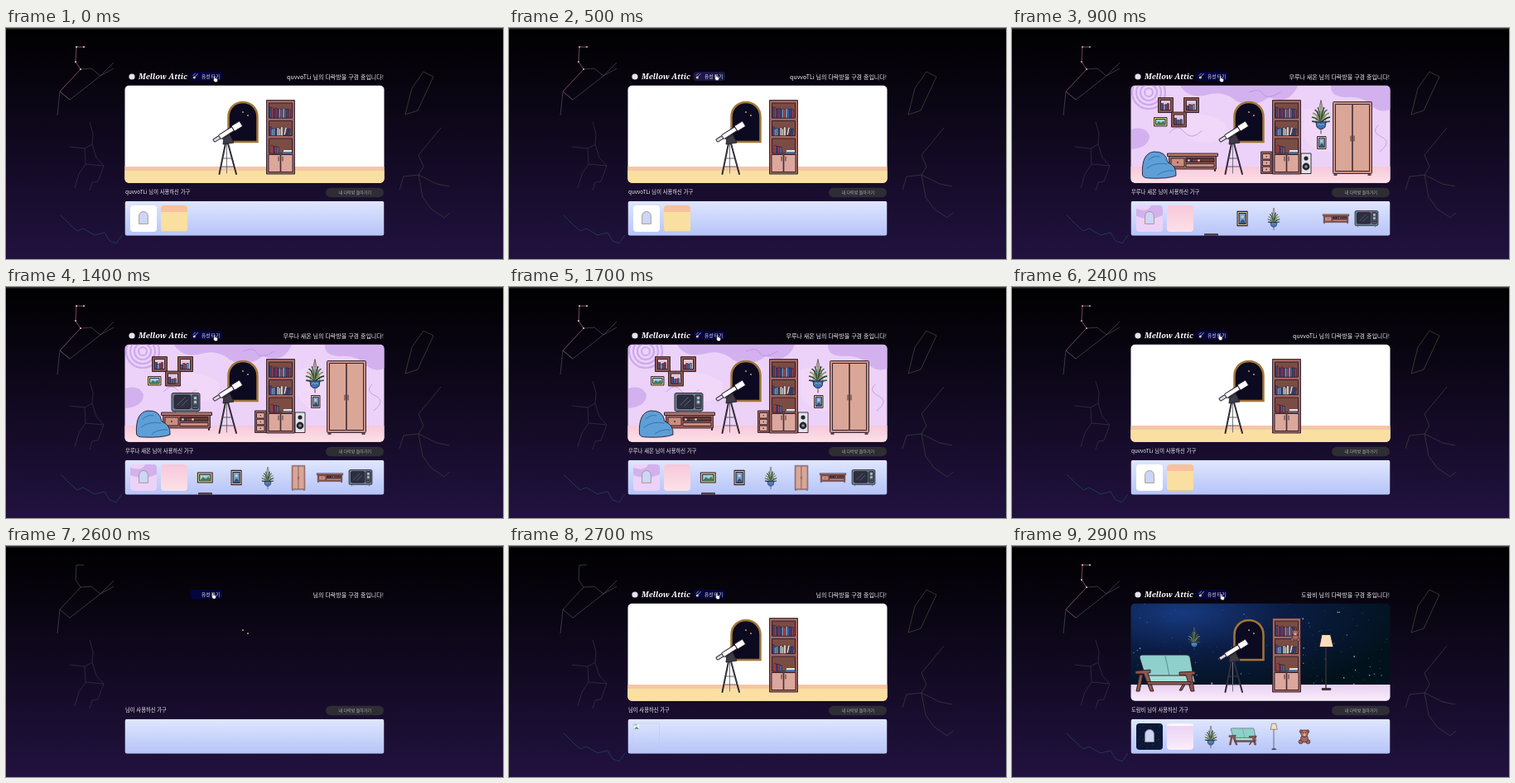
An HTML page that plays this animation: 600 px wide and 280 px high, repeating every 3 s.

```html
<!DOCTYPE html>
<html lang="ko">
<head>
<meta charset="utf-8">
<style>
html, body { margin: 0; width: 100%; height: 100%; overflow: hidden; background: #000; }
svg { display: block; width: 600px; height: 280px; }
text { font-family: "Noto Sans CJK KR", "Noto Sans CJK", "Noto Sans", sans-serif; font-weight: 500; fill: #f2f2f6; }
.logo { font: italic bold 9.2px "Noto Serif", serif; fill: #fff; }
.o { stroke: #2a1b2b; stroke-width: .9; stroke-linejoin: round; }
.sky path { fill: none; stroke-width: .7; }
</style>
</head>
<body>
<svg id="stage" viewBox="0 0 600 280"></svg>
<script>
const LOOP = 3000;
const box = (x, y, w, h, fill, r = 0, cls = '') =>
  `<rect x="${x}" y="${y}" width="${w}" height="${h}" rx="${r}" fill="${fill}" class="${cls}"/>`;
const obox = (x, y, w, h, fill, r = 0) => box(x, y, w, h, fill, r, 'o');
const path = (d, fill, extra = 'class="o"') => `<path d="${d}" fill="${fill}" ${extra}/>`;
const line = (d, color, w = 1) => path(d, 'none', `stroke="${color}" stroke-width="${w}" stroke-linecap="round"`);
const dot = (x, y, r, fill, extra = '') => `<circle cx="${x}" cy="${y}" r="${r}" fill="${fill}" ${extra}/>`;
const group = (id, body, extra = '') => `<g id="${id}" ${extra}>${body}</g>`;
const use = (id, x, y, cx, cy, s) =>
  `<use href="#${id}" transform="translate(${x} ${y}) scale(${s}) translate(${-cx} ${-cy})"/>`;
const label = (id, x, y, size, str, extra = '') =>
  `<text id="${id}" x="${x}" y="${y}" font-size="${size}" ${extra}>${str}</text>`;
const repeat = (n, f) => Array.from({ length: n }, (_, i) => f(i)).join('');

let seed = 7;
const rnd = () => (seed = seed * 16807 % 2147483647) / 2147483647;

// Furniture, drawn at its place in the room
const BOOKS = ['#3f6fa8', '#b5444c', '#e7dfd2', '#4b4380', '#7fa9cf', '#8a3d5c', '#2f4f7c'];
const books = (x, y, n, h, w = 2.3) => repeat(n, i => {
  const bh = h - rnd() * 3;
  return `<g stroke="#241a30" stroke-width=".5">${box(x + i * w, y - bh, w, bh, BOOKS[Math.floor(rnd() * 7)])}</g>`;
});
const arch = (fill, edge, w) =>
  path('M268.5 138V108C268.5 84 303.5 84 303.5 108V138Z', fill, `stroke="${edge}" stroke-width="${w}"`);

const shelf = obox(314.5, 87.5, 34, 89.5, '#a2675e') + [91, 112.5, 134].map(y => obox(317.5, y, 28, 18, '#7b4c44')).join('') +
  books(318, 109, 11, 13) + books(318, 130.5, 7, 11) +
  `<g transform="rotate(12 337 130)">${books(335, 130, 3, 11)}</g>` + books(320, 152, 4, 10) +
  box(335, 148, 10, 2, '#ede3d5') + box(334, 150, 11, 2, '#4c78a8') +
  obox(317, 153.5, 14.2, 21, '#dca79c') + obox(331.8, 153.5, 14.2, 21, '#dca79c') +
  line('M329 156V161M334 156V161', '#4b2c32');

const scope = line('M265 140L257.5 177M268 140L278 177', '#302e37', 2) + line('M266.5 140V176', '#77757f', 1) +
  line('M261 158H272M259.5 168H275', '#44424b', .8) +
  path('M263 133L270 129L275 139L262 141Z', '#3d3b45') +
  `<g transform="rotate(-32 267 126)">${obox(247.5, 124.5, 9, 4, '#d9dae2', 1)}${obox(256, 123.6, 19, 5.6, '#fff', 1)}` +
  `${obox(275, 122.6, 11.5, 7.4, '#fff', 1)}${line('M258 130.5H268', '#2f2d36', 1.3)}</g>`;

const cube = (x, y) => obox(x, y, 18, 18, '#8b564b') + obox(x + 3, y + 3, 12, 12, '#e2c6d9') + books(x + 4, y + 15, 4, 8);
const cabinet = obox(187.5, 152, 61, 3.5, '#b27a6e') + obox(189.5, 155.5, 57, 15.5, '#a5675a') +
  obox(192, 158, 16, 10, '#c98e7f') + obox(210, 157.5, 34, 5, '#5f3a35') + obox(210, 164.5, 34, 4, '#c98e7f') +
  books(212, 162, 5, 4, 3) + dot(200, 163, 1, '#4b2c32') + line('M191 172V173M245 172V173', '#2a1b2b', 2);
const tv = obox(200, 128.5, 34, 22, '#67808f', 2) + obox(203, 131, 20, 16.5, '#2d2f40', 2) +
  line('M207 143L216 134M212 144L219 137', '#5a6478', 1) + obox(225, 131, 7, 16.5, '#4a5b69', 1) +
  dot(228.5, 134.5, 1.7, '#b9c3c9') + dot(228.5, 139.5, 1.7, '#b9c3c9') + line('M226.5 144H230.5M204 152V152M230 152V152', '#25232c');
const wardrobe = obox(387.5, 89.5, 47, 87, '#c99080', 1) + obox(390.5, 92.5, 20.3, 81, '#d9a697') +
  obox(411.2, 92.5, 20.3, 81, '#d9a697') + line('M409 131V137M413 131V137', '#4b2c32') +
  line('M389 178H392M430 178H433', '#2a1b2b', 1.5);
const plant = line('M373 88L367 113M373 88L379 113M373 88V98', '#6b5a50', .8) +
  repeat(11, i => {
    const a = (i - 5) * .36, x = 373 + Math.sin(a) * 10.5, y = 110 - Math.cos(a) * 14;
    return line(`M373 115Q${(x + 373) / 2} ${y + 1} ${x.toFixed(1)} ${y.toFixed(1)}`, ['#243d33', '#3b6247', '#8a9358'][i % 3], 1.7);
  }) + path('M367 114H379L378 120Q373 125.5 368 120Z', '#3d74b4') + line('M369 118L371 116L373 118L375 116L377 118', '#9cc4e6', .7) +
  line('M373 124V128', '#4a4650');
const portrait = obox(368.5, 131.5, 10.5, 15, '#d9cfa9') + obox(370.3, 133.3, 7, 11.4, '#6f9fd0') +
  path('M371 144Q374 136 377 144Z', '#33517f', '') + dot(373.8, 137, 1.5, '#e3c79b');
const landscape = obox(171.5, 108.5, 15.5, 10.5, '#d6cf76') + obox(173.5, 110.5, 11.5, 6.5, '#9fcde0') +
  path('M173.8 117L177 113L180 115L183 112.5L184.8 117Z', '#3f7d55', '');
const beanbag = path('M157.5 178Q156 152 171 150Q186 149 188 163Q199 167 198 179Q188 183 166 182Q158 182 157.5 178Z', '#5e9fd8') +
  line('M163 170Q173 162 187 165M165 160Q171 154 178 156M176 178Q184 172 195 173', '#3a6ca3', .9);
const drawers = obox(300.5, 150, 13.5, 26.5, '#a2675e') +
  repeat(3, i => obox(302.5, 152.5 + i * 7.8, 9.5, 6.5, '#dca79c') + dot(307.2, 155.8 + i * 7.8, .8, '#4b2c32'));
const speaker = obox(349, 152, 12, 24.5, '#e4e3ea') + dot(355, 158, 2.6, '#26242d') + dot(355, 168, 4.4, '#26242d') +
  dot(355, 168, 1.8, '#8d8b98');
const chair = path('M154 135Q154 132 157 132H211Q214 132 215 135L219 158H161Z', '#8fd0cc') +
  line('M185 133L190 157', '#4d8a88', .9) + path('M162 157H219L221 165H163Z', '#a5ded8') +
  path('M149 151.5L167 150V153.5L164 154L171 176H167L159 155L149 155ZM154 156H158L154 176H150Z', '#8e5749') +
  path('M202 153L221 152V155.5L217 156L220 176H216L210 156.5L202 156.5ZM206 168H209L205 175H202Z', '#8e5749') +
  path('M163 164.5H216V168H164Z', '#8e5749');
const lamp = line('M379 122V173', '#39333a', 1.4) + path('M374 107.5H384.5L388 122.5H371Z', '#f8dfba') +
  obox(374, 172.5, 11, 2, '#4d4147', 1);
const teddy = `<g class="o" style="stroke-width:.5">${dot(339, 103.5, 1.6, '#a9655a')}${dot(345, 103.5, 1.6, '#a9655a')}` +
  `${dot(338.5, 113.5, 2, '#a9655a')}${dot(345.5, 113.5, 2, '#a9655a')}${dot(342, 110.5, 3.6, '#a9655a')}${dot(342, 105.5, 3.4, '#b5705f')}</g>` +
  dot(342, 106.7, 1.2, '#e0b39a') + dot(340.8, 104.8, .4, '#222') + dot(343.2, 104.8, .4, '#222');

const items = { shelf, scope, cabinet, tv, wardrobe, plant, portrait, landscape, chair, lamp, teddy, mini: arch('#cbd6fb', '#a88468', 2.4) };
const put = id => `<use href="#${id}"/>`;

// Walls and floors
const wall = fill => box(143, 69, 314, 119, fill), floor = fill => box(143, 168, 314, 20, fill);
const plainWall = wall('#fff') + floor('#f6c6a4') + box(143, 173, 314, 15, '#f9e0a1');
const blobs = path('M203 70Q214 88 240 80Q258 77 270 88Q290 99 310 84Q335 94 345 70ZM385 70Q384 83 402 84Q425 82 436 96Q448 104 457 98V70ZM144 123Q160 118 166 130Q166 145 144 147Z', '#cda9ee', 'opacity=".8"') +
  path('M200 110Q225 96 257 115Q262 137 236 139Q205 139 200 110ZM352 100Q375 92 388 112V150Q360 152 352 130Z', '#f4daf8', 'opacity=".7"') +
  repeat(4, i => `<circle cx="165" cy="78" r="${5 + i * 5}" fill="none" stroke="#cda9ee" stroke-width="2.2"/>`) +
  line('M190 127Q200 115 208 126T229 125M286 78Q299 72 303 80T324 78M442 118Q433 126 446 132T444 150', '#b18bdc', .7);
const pinkWall = wall('#ecd2f8') + blobs + floor('url(#pinkFloor)');
const nightWall = wall('url(#night)') +
  repeat(170, () => dot((144 + rnd() * 312).toFixed(1), (70 + rnd() * 98).toFixed(1), (.25 + rnd() ** 4 * .8).toFixed(2),
    rnd() < .4 ? '#7fb8e8' : '#c3d3e6', `opacity="${(.35 + rnd() * .6).toFixed(2)}"`)) +
  floor('url(#lilacFloor)');

const basics = arch('#0b0a20', '#a17637', 2.5) + put('shelf') + put('scope');
const pinkRoom = pinkWall + cube(176.5, 84.5) + cube(207.5, 84.5) + cube(192.5, 102) + ['landscape', 'cabinet'].map(put).join('') +
  group('tvSet', put('tv')) + beanbag + basics + drawers + speaker + ['plant', 'portrait', 'wardrobe'].map(put).join('');
const nightRoom = nightWall + use('plant', 220, 112, 373, 107, .68) + basics + ['teddy', 'chair', 'lamp'].map(put).join('');

// Furniture lists below the room
const tile = (x, fill) => box(x, 215, 32, 32, fill, 4);
const tileTop = fill => path('M187 223V219Q187 215 191 215H215Q219 215 219 219V223Z', fill, '');
const miniArch = use('mini', 166, 230, 286, 114, .31);
const plainList = tile(150, '#fff') + miniArch + tile(187, '#f9dfa0') + tileTop('#f8c19e') + line('M190 246.5H217', '#efcd88', 1);
const pinkList = tile(150, '#ecd2f8') + path('M150 219Q164 224 168 215H178Q182 215 182 219V227Q166 235 150 228Z', '#cda9ee', 'opacity=".8"') + miniArch +
  tile(187, 'url(#pinkFloor)') + use('portrait', 278, 231, 373.7, 139, 1.15) + use('plant', 316, 231, 373, 107, .66) +
  use('cabinet', 391, 231, 218, 162, .52) + use('tv', 428, 231, 217, 140, .82) + obox(232.5, 249.8, 16, 1.4, '#7a4b40') +
  group('lateItems', use('landscape', 240, 231, 179, 113.7, 1.15) + use('wardrobe', 353, 231, 411, 133, .34));
const nightList = tile(150, '#0b1838') + repeat(25, () => dot((151 + rnd() * 30).toFixed(1), (216 + rnd() * 30).toFixed(1), .3, '#7ba0c4')) +
  miniArch + tile(187, 'url(#lilacFloor)') + `<g transform="translate(0 129) scale(1 .4)">${tileTop('#fdf5fd')}</g>` +
  use('plant', 240, 231, 373, 107, .66) + use('chair', 278.5, 231, 185, 154, .46) +
  use('lamp', 316, 231, 379, 141, .47) + use('teddy', 353, 231, 342, 108.5, 1.25);
const brokenList = `<rect x="150" y="215" width="31.5" height="31.5" fill="none" stroke="#c2c9e6" stroke-width=".6"/>` +
  box(151, 216, 6, 6, '#f7f9ff') + path('M151 222L154 218.5L157 222Z', '#68a36c', '') + box(151, 216, 4, 1.5, '#9bb3dc');

// Constellations
const sky = [
  ['c1', '#514b5f', 'M94 23H85L84 41L90 50L103 49L114 58L130 42M114 58L130 49M114 58L77 87L65 77L90 50M65 77L62 106'],
  ['c2', '#37354a', 'M101 114L105 128L104 141L95 146L96 165L118 167L109 157L104 141M95 146L76 144M96 165L88 177L83 194M118 167L111 186L104 187L101 197'],
  ['c3', '#234b5b', 'M66 227L78 239L86 246L93 243L107 251L119 248L125 258L133 261L140 251'],
  ['c4', '#4d4d38', 'M490 73L504 53L516 59L497 100L482 105Z'],
  ['c5', '#3d4340', 'M525 121L498 154L504 168L498 178L480 180L475 196M498 178L520 189L535 192M498 178L503 205L513 219L529 230L536 224']
].map(([id, color, d]) => group(id, path(d, 'none', `stroke="${color}"`))).join('');
const lit = line('M94 23H85L84 41L90 50L65 77L77 87', '#7c4454', .8) +
  [[94, 23], [85, 23], [84, 41], [90, 50]].map(([x, y]) => dot(x, y, 1.1, '#e8b9c4')).join('');

const ramp = (id, a, b) =>
  `<linearGradient id="${id}" x1="0" y1="0" x2="0" y2="1"><stop stop-color="${a}"/><stop offset="1" stop-color="${b}"/></linearGradient>`;
const glow = '<radialGradient id="night" cx=".2" cy=".1" r=".85"><stop stop-color="#173a80"/>' +
  '<stop offset=".45" stop-color="#0b1d45"/><stop offset="1" stop-color="#02121d"/></radialGradient>';

const $ = id => document.getElementById(id);
$('stage').innerHTML = `<defs>${ramp('bg', '#000', '#21123f')}${ramp('panel', '#dfe6ff', '#b6c4f7')}${ramp('pinkFloor', '#f7c8da', '#fde1e8')}` +
  `${glow}${ramp('lilacFloor', '#e8d0f3', '#fbeefb')}` +
  `<clipPath id="frame">${box(143.5, 69.8, 313, 117.9, '#fff', 5)}</clipPath><clipPath id="tray">${box(143.5, 209.8, 313, 42, '#fff', 3)}</clipPath>` +
  Object.entries(items).map(([id, body]) => group(id, body)).join('') + '</defs>' +
  box(0, 0, 600, 280, 'url(#bg)') + box(0, 0, 600, 1.5, '#333238') + group('sky', sky, 'class="sky"') + group('lit', lit) +
  group('logo', dot(152, 59, 3.6, '#e4e4ec') + '<text class="logo" x="160" y="62">Mellow Attic</text>') +
  '<rect id="pill" x="222.5" y="53" width="38.5" height="11" rx="4"/>' +
  group('meteor', line('M231.5 55.5L227.5 59.5M228.5 55L226 57.5', '#8b91d5', 1) + dot(227.3, 60, 1.6, '#e2c48b')) +
  label('', 236, 60.8, 5.6, '유성 타기') + label('title', 456, 62.3, 7, '', 'text-anchor="end"') +
  '<g clip-path="url(#frame)">' + group('room1', plainWall + basics) + group('room2', pinkRoom) + group('room3', nightRoom) + '</g>' +
  dot(286, 102, .9, '#d8b267') + dot(292, 106, .9, '#d8b267') +
  label('owner', 144, 201.4, 6.3, '') + box(386, 193.7, 70, 11.6, '#2e2d33', 5.8) +
  label('', 421.3, 201.3, 5, '내 다락방 돌아가기', 'text-anchor="middle" style="fill:#aeadb3"') +
  '<g clip-path="url(#tray)">' + box(143.5, 209.8, 313, 42, 'url(#panel)') + group('list1', plainList) + group('list2', pinkList) +
  group('list3', nightList) + group('list4', brokenList) + '</g>' +
  group('hand', path('M0 0Q.9-.8 1.5 0V2.4L4.4 3V5.5L3.5 7H1L-.9 4.2L0 3.9Z', '#fff', 'stroke="#111" stroke-width=".4"'));

// start, room, list, name, lit stars
const STATES = [
  [0, 1, 1, 'quvvoTLi', 1],
  [700, 1, 4, '', 1],
  [800, 2, 2, '무루나 새온', 1],
  [1800, 1, 4, '', 0],
  [1900, 1, 1, 'quvvoTLi', 1],
  [2500, 0, 0, '', 0],
  [2700, 1, 4, '', 0],
  [2800, 3, 3, '도람비', 1]
];
const HAND = [[0, 251, 58.5], [500, 249, 56.5], [900, 251, 58.5], [1800, 251, 58.5], [2600, 249, 57], [2900, 252, 58.5], [3000, 251, 58.5]];
const show = (id, on) => $(id).style.display = on ? '' : 'none';

function draw(t) {
  const [, room, list, name, stars] = STATES.findLast(s => s[0] <= t);
  [1, 2, 3].forEach(i => show('room' + i, room === i));
  [1, 2, 3, 4].forEach(i => show('list' + i, list === i));
  ['logo', 'meteor', 'c3', 'c4', 'c5'].forEach(id => show(id, room));
  show('lit', stars);
  $('lit').style.opacity = .9 + .1 * Math.cos(t / LOOP * 4 * Math.PI);
  show('tvSet', t >= 1000);
  show('lateItems', t >= 1000);
  const head = name && name + ' ';
  $('title').textContent = head + '님의 다락방을 구경 중입니다!';
  $('owner').textContent = head + '님이 사용하신 가구';
  $('pill').setAttribute('fill', t >= 100 && t < 700 ? '#1b174a' : '#04043f');

  const k = HAND.findLastIndex(h => h[0] <= t), [a, x, y] = HAND[k], [b, x2, y2] = HAND[k + 1];
  const u = (t - a) / (b - a);
  $('hand').setAttribute('transform', `translate(${x + (x2 - x) * u} ${y + (y2 - y) * u})`);
}

const start = performance.now();
function tick() {
  draw(Math.floor((performance.now() - start) % LOOP / 100) * 100);
  requestAnimationFrame(tick);
}
tick();
</script>
</body>
</html>
```
